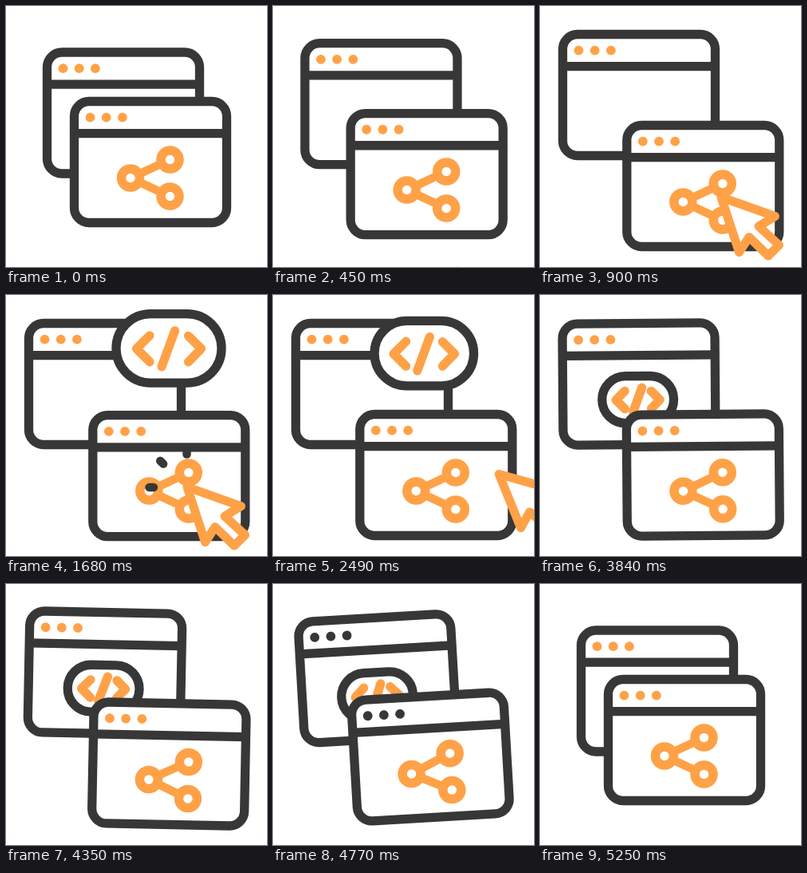
These frames come from a looping animation (327 px wide and 327 px high, 5.4 s). An HTML page with a canvas:

```html
<!DOCTYPE html>
<html lang="en">
<head>
<meta charset="utf-8">
<title>Shared windows</title>
<style>
html, body { margin: 0; width: 100%; height: 100%; overflow: hidden; background: #fff; }
canvas { display: block; width: 327px; height: 327px; }
</style>
</head>
<body>
<canvas id="stage"></canvas>
<script>
const SIZE = 327, LOOP = 5400;
const DARK = '#373737', ORANGE = '#ffa147', WHITE = '#fff';
const canvas = document.getElementById('stage');
const ctx = canvas.getContext('2d');
const dpr = window.devicePixelRatio || 1;
canvas.width = canvas.height = Math.round(SIZE * dpr);

const mix = (a, b, p) => a + (b - a) * p;
const ramp = (t, from, to) => Math.min(1, Math.max(0, (t - from) / (to - from)));
const ease = (t, from, to) => {
  const u = ramp(t, from, to);
  return u * u * (3 - 2 * u);
};
const radians = deg => deg * Math.PI / 180;
const press = t => 3 * Math.sin(Math.PI * ramp(t, 1250, 1740));
const separation = t => ease(t, 0, 900) - ease(t, 4500, 5250);

function at(x, y, angle, draw) {
  ctx.save();
  ctx.translate(x, y);
  ctx.rotate(angle);
  draw();
  ctx.restore();
}

function line(points, color, width, closed) {
  ctx.beginPath();
  points.forEach(([x, y]) => ctx.lineTo(x, y));
  if (closed) {
    ctx.closePath();
    ctx.fillStyle = WHITE;
    ctx.fill();
  }
  ctx.strokeStyle = color;
  ctx.lineWidth = width;
  ctx.stroke();
}

function box(w, h, r) {
  ctx.beginPath();
  ctx.roundRect(-w / 2, -h / 2, w, h, r);
  ctx.fillStyle = WHITE;
  ctx.fill();
  ctx.strokeStyle = DARK;
  ctx.lineWidth = 11.3;
  ctx.stroke();
}

function dotColor(t) {
  const p = Math.max(
    ease(t, 1800, 1920) - ease(t, 2100, 2220),
    ease(t, 4540, 4680) - ease(t, 4880, 5040)
  );
  const [r, g, b] = [[255, 55], [161, 55], [71, 55]].map(([a, z]) => Math.round(mix(a, z, p)));
  return `rgb(${r},${g},${b})`;
}

function browser(t) {
  box(191, 152, 18.5);
  line([[-95, -35.8], [95, -35.8]], DARK, 11.3);
  ctx.fillStyle = dotColor(t);
  for (let i = 0; i < 3; i++) {
    ctx.beginPath();
    ctx.arc(-75.5 + i * 20.2, -55.8, 5.9, 0, 7);
    ctx.fill();
  }
}

function share() {
  const hub = [-25, 20], top = [24.5, -3], low = [24.5, 43];
  line([top, hub, low], ORANGE, 10.5);
  for (const [x, y] of [hub, top, low]) {
    ctx.beginPath();
    ctx.arc(x, y, 11.5, 0, 7);
    ctx.fillStyle = WHITE;
    ctx.fill();
    ctx.strokeStyle = ORANGE;
    ctx.lineWidth = 11.5;
    ctx.stroke();
  }
}

// Code badge: rises from behind the front window, then parks on the back one.
function badge(t) {
  const rise = ease(t, 1050, 1770), park = ease(t, 2265, 3100);
  const parkedY = 19.5 + 8 * (1 - separation(t));
  const x = mix(80, -1.5, park);
  const y = mix(mix(99, -51, rise), parkedY, park);
  const s = mix(1, 0.68, park);
  const glyph = pts => line(pts.map(([a, b]) => [a * s, b * s]), ORANGE, 11.2);
  at(x, y, 0, () => {
    box(132 * s, 86.5 * s, 43 * s);
    glyph([[-24, -16], [-40.5, 0.5], [-24, 17]]);
    glyph([[7.5, -22], [-9, 23]]);
    glyph([[24.5, -15.5], [40.5, 0.5], [24.5, 17]]);
  });
}

function clickRays(t) {
  if (t < 1450 || t > 1730) return;
  const head = mix(20, 47, ease(t, 1450, 1560));
  const tail = mix(20, 47, ease(t, 1560, 1730));
  for (let i = 0; i < 3; i++) {
    const a = Math.PI * (1 + i / 4);
    const c = Math.cos(a), s = Math.sin(a);
    line([[226.5 + tail * c, 241 + tail * s], [226.5 + head * c, 241 + head * s]], DARK, 10.5);
  }
}

function cursor(t) {
  if (t < 300 || t > 3040) return;
  const enter = 1 - ease(t, 300, 900), leave = ease(t, 1940, 3040);
  const x = 227 + 6 * enter + 112 * leave;
  const y = 239.5 + 110 * enter - 30 * leave + press(t);
  at(x, y, radians(-8 * leave), () => {
    line([[0, 0], [67.5, 24], [47, 36.5], [72.5, 60], [59, 73.5], [35, 50], [22.5, 69]], ORANGE, 11, true);
  });
}

function render(t) {
  ctx.setTransform(dpr, 0, 0, dpr, 0, 0);
  ctx.fillStyle = WHITE;
  ctx.fillRect(0, 0, SIZE, SIZE);
  ctx.lineCap = ctx.lineJoin = 'round';

  const apart = separation(t);
  const sway = t < 3320 ? 0
    : -4 * Math.sin(2 * Math.PI * (t - 3320) / 1080) * (1 - ease(t, 4850, 5250));
  const angle = radians(sway);

  at(147 - 23 * apart, 134 - 22.5 * apart, angle, () => {
    browser(t);
    if (t > 1050) badge(t);
  });
  at(181 + 23.3 * apart, 195.5 + 30 * apart + press(t), angle, () => {
    browser(t);
    at(0, -press(t), 0, share);
  });
  clickRays(t);
  cursor(t);
}

const start = performance.now();
function tick() {
  render((performance.now() - start) % LOOP);
  requestAnimationFrame(tick);
}
tick();
</script>
</body>
</html>
```
